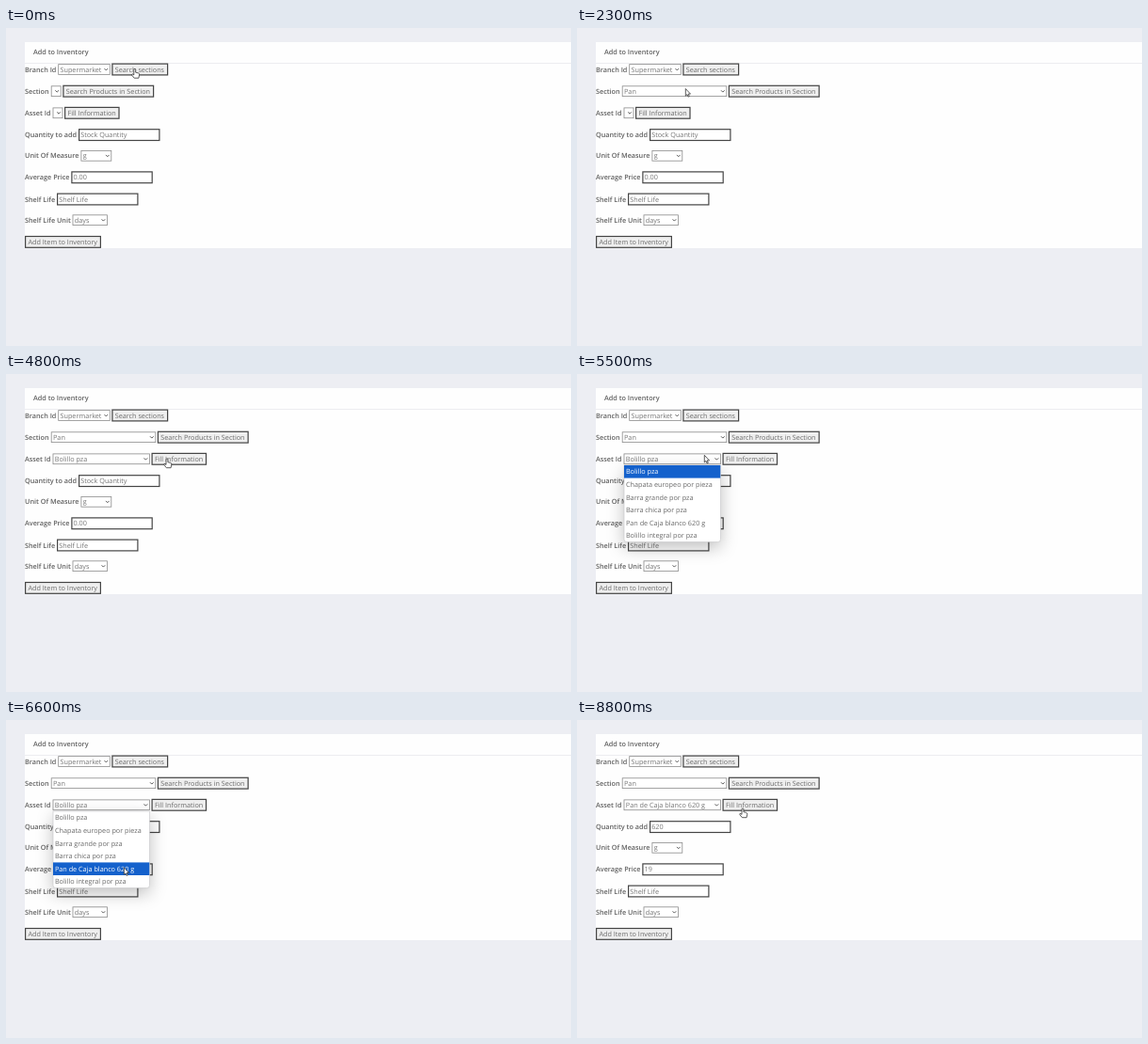
Write an HTML page with a canvas that moves like this. It is 600 by 338 pixels and loops after 8900 ms.

```html
<!DOCTYPE html>
<html lang="en">
<head>
<meta charset="utf-8">
<title>Add to Inventory</title>
<style>
  html, body { margin: 0; width: 100%; height: 100%; overflow: hidden; background: #edeef3; }
  canvas { display: block; width: 100vw; height: 100vh; }
</style>
</head>
<body>
<canvas id="stage" width="600" height="338"></canvas>
<script>
const ctx = document.getElementById('stage').getContext('2d');
const LOOP = 8900, STEP = 100;
const FONT = '7.25px "Open Sans", sans-serif';
const LABEL = '#606060', FIELD = '#747474', EDGE = '#454545';
const OPTIONS = ['Bolillo pza', 'Chapata europeo por pieza', 'Barra grande por pza',
  'Barra chica por pza', 'Pan de Caja blanco 620 g', 'Bolillo integral por pza'];
const LIST = { x: 50, y: 97, w: 102.5, row: 13.6 };
const PICKED = 4;

// Pointer moves: start time, end time, end point
const START = [136.8, 43.5];
const MOVES = [
  [1000, 1500, 195, 64.5],
  [1700, 2300, 115.3, 64.5],
  [4100, 4500, 171, 90],
  [5000, 5300, 135.3, 86.3],
  [5800, 6300, 125.3, 156.8],
  [6700, 7100, 176, 94]
];

const ARROW = new Path2D('M0 0V7.6L1.7 6.1 2.8 8.6 4 8.1 2.9 5.6H5.2Z');
const HAND = new Path2D('M-1 .9a.95.95 0 0 1 1.9 0V3.7l2.8.7q1.3.4 1.1 1.8L4.1 9.7H-.6' +
  'L-3 6.8q-.7-1.1.2-1.4.7-.1 1.8 1Z');

let buttons = [];

function text(str, x, mid, color = FIELD, weight = 400) {
  ctx.font = weight + ' ' + FONT;
  ctx.fillStyle = color;
  ctx.fillText(str, x, mid + 2.6);
}

function box(x, y, w, h, fill, edge, line) {
  ctx.fillStyle = fill;
  ctx.fillRect(x, y, w, h);
  ctx.strokeStyle = edge;
  ctx.lineWidth = line;
  ctx.strokeRect(x + line / 2, y + line / 2, w - line, h - line);
}

const label = (str, mid) => text(str, 20, mid, LABEL, 600);

function button(str, x, right, mid) {
  box(x, mid - 6.5, right - x, 13, '#efefef', EDGE, 1.2);
  text(str, x + 3.4, mid, '#6a6a6a');
  buttons.push([x, mid - 6.5, right, mid + 6.5]);
}

function input(str, x, mid) {
  box(x, mid - 6.5, 86.5, 13, '#fff', EDGE, 1.2);
  text(str, x + 2.2, mid);
}

function select(str, x, right, mid) {
  box(x, mid - 5.8, right - x, 11.6, '#fff', '#8c8c8c', 0.8);
  text(str, x + 2.2, mid);
  const cx = right - 4.4;
  ctx.beginPath();
  ctx.moveTo(cx - 1.8, mid - 0.9);
  ctx.lineTo(cx, mid + 0.9);
  ctx.lineTo(cx + 1.8, mid - 0.9);
  ctx.strokeStyle = '#444';
  ctx.lineWidth = 0.9;
  ctx.stroke();
}

function pointerAt(t) {
  let [x, y] = START;
  for (const [from, to, tx, ty] of MOVES) {
    const u = Math.min(1, Math.max(0, (t - from) / (to - from)));
    const e = u * u * (3 - 2 * u);
    x += (tx - x) * e;
    y += (ty - y) * e;
  }
  return [x, y];
}

function dropdown(py) {
  const { x, y, w, row } = LIST;
  const h = row * OPTIONS.length;
  const active = py > y ? Math.floor((py - y) / row) : 0;
  ctx.save();
  ctx.beginPath();
  ctx.roundRect(x, y, w, h, [0, 0, 3, 3]);
  ctx.fillStyle = '#fff';
  ctx.shadowColor = 'rgba(0,0,0,.25)';
  ctx.shadowBlur = 18;
  ctx.shadowOffsetY = 6;
  ctx.fill();
  ctx.shadowColor = 'transparent';
  ctx.strokeStyle = '#c4c4c8';
  ctx.lineWidth = 0.6;
  ctx.stroke();
  ctx.clip();
  OPTIONS.forEach((name, i) => {
    const top = y + i * row;
    if (i === active) {
      ctx.fillStyle = '#1461cc';
      ctx.fillRect(x, top, w, row);
    }
    text(name, x + 1.9, top + row / 2 - 0.1, i === active ? '#fff' : '#686868');
  });
  ctx.restore();
}

function pointer(x, y, open) {
  const over = !open && buttons.some(([l, t, r, b]) => x > l && x < r && y >= t && y < b);
  const shape = over ? HAND : ARROW;
  ctx.save();
  ctx.translate(x, y);
  ctx.lineJoin = 'round';
  ctx.lineWidth = 0.8;
  ctx.strokeStyle = '#333';
  ctx.fillStyle = '#fff';
  ctx.fill(shape);
  ctx.stroke(shape);
  ctx.restore();
}

function formValues(t) {
  const quantity = t >= 7300 ? '620' : t >= 4900 ? '1' : 'Stock Quantity';
  const unit = t >= 4900 && t < 7300 ? 'pza' : 'g';
  const price = t >= 7400 ? '19' : t >= 5100 ? '2' : '0.00';
  return { quantity, unit, price };
}

function draw(t) {
  const { quantity, unit, price } = formValues(t);
  const [px, py] = pointerAt(t);
  const open = t >= 5500 && t < 6700;
  buttons = [];

  ctx.fillStyle = '#edeef3';
  ctx.fillRect(0, 0, 600, 338);
  ctx.fillStyle = '#fefefe';
  ctx.fillRect(20, 15, 580, 219);
  ctx.fillStyle = '#ededf0';
  ctx.fillRect(20, 37, 580, 1);
  text('Add to Inventory', 29, 25.8, LABEL, 600);

  label('Branch Id', 44);
  select('Supermarket', 55.3, 110.7, 44);
  button('Search sections', 112.3, 172.2, 44);

  label('Section', 67.2);
  const sections = t >= 500;
  select(sections ? 'Pan' : '', 47.8, sections ? 159.2 : 58.6, 67.2);
  button('Search Products in Section', sections ? 160.8 : 60.3, sections ? 257.7 : 157.2, 67.2);

  label('Asset Id', 90.3);
  const assets = t >= 3800;
  select(assets ? OPTIONS[t >= 6700 ? PICKED : 0] : '', 49.6, assets ? 152.8 : 60.4, 90.3);
  button('Fill Information', assets ? 154.5 : 62, assets ? 213.1 : 120.6, 90.3);

  label('Quantity to add', 113.6);
  input(quantity, 77, 113.6);

  label('Unit Of Measure', 135.8);
  select(unit, 79.5, 112.2, 135.8);

  label('Average Price', 158.8);
  input(price, 69.3, 158.8);

  label('Shelf Life', 182);
  input('Shelf Life', 54, 182);

  label('Shelf Life Unit', 204.2);
  select('days', 70.6, 107.8, 204.2);

  button('Add Item to Inventory', 20, 101, 227.4);

  if (open) dropdown(py);
  pointer(px, py, open);
}

ctx.textRendering = 'geometricPrecision';
const began = performance.now();

function tick() {
  const t = (performance.now() - began) % LOOP;
  draw(Math.floor(t / STEP) * STEP);
  requestAnimationFrame(tick);
}
tick();
</script>
</body>
</html>
```
